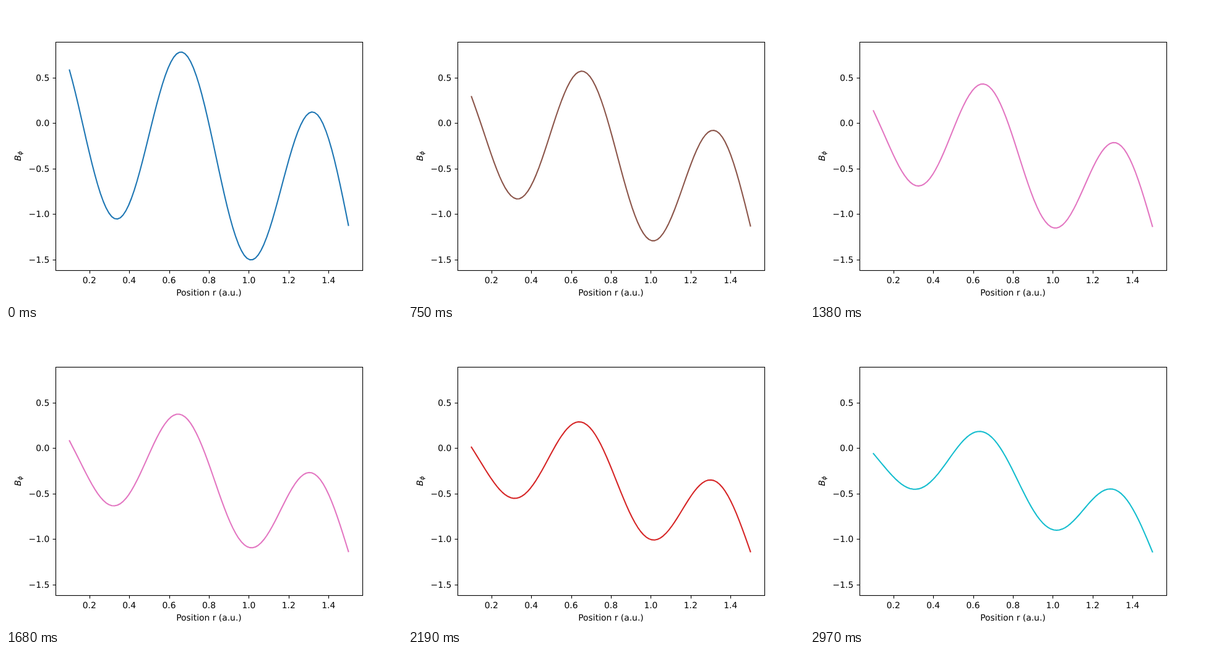
An HTML page that plays this animation: 640x480 px, repeating every 3 s.

```html
<!DOCTYPE html>
<html lang="en">
<head>
<meta charset="utf-8">
<title>Field profile over time</title>
<style>
  html, body { margin: 0; width: 100%; height: 100%; overflow: hidden; background: #fff; }
  svg { display: block; width: 640px; height: 480px; }
  text { font: 13.89px "DejaVu Sans", sans-serif; text-rendering: geometricPrecision; }
  .axis { fill: none; stroke: #000; stroke-width: 1.11; }
  #curve { fill: none; stroke-width: 2.083; stroke-linecap: square; stroke-linejoin: round; }
</style>
</head>
<body>
<svg viewBox="0 0 640 480">
  <path id="curve"/>
  <rect class="axis" x="80.5" y="58.5" width="496" height="369"/>
  <g id="ticks"></g>
  <text x="328" y="468" text-anchor="middle">Position r (a.u.)</text>
  <text transform="translate(23.6 250.5) rotate(-90)" font-style="italic" style="font-style:italic">B<tspan dy="2.2" style="font-size:9.72px">ϕ</tspan></text>
</svg>
<script>
const STEP = 30, STEPS = 100, POINTS = 100;
const R0 = 0.1, R1 = 1.5, H = (R1 - R0) / (POINTS - 1);
const COLORS = ['#1f77b4', '#ff7f0e', '#2ca02c', '#d62728', '#9467bd',
                '#8c564b', '#e377c2', '#7f7f7f', '#bcbd22', '#17becf'];

const px = r => 80 + (r - 0.03) / 1.54 * 496;
const py = b => 189.08 - b * 146.99;
const snap = v => Math.floor(v + 0.5) + 0.5;

function add(tag, attrs, label) {
  const el = document.createElementNS('http://www.w3.org/2000/svg', tag);
  for (const k in attrs) el.setAttribute(k, attrs[k]);
  if (label) el.textContent = label;
  document.getElementById('ticks').append(el);
}

for (let i = 1; i <= 7; i++) {
  const v = i * 0.2, x = px(v);
  add('path', { class: 'axis', d: `M${snap(x)} 427.5V432.4` });
  add('text', { x, y: 448, 'text-anchor': 'middle' }, v.toFixed(1));
}
for (let i = -3; i <= 1; i++) {
  const v = i * 0.5, y = py(v);
  add('path', { class: 'axis', d: `M80.5 ${snap(y)}H75.6` });
  add('text', { x: 70.3, y: y + 5.2, 'text-anchor': 'end' }, v.toFixed(1).replace('-', '−'));
}

// Cylindrical diffusion with slowly relaxing end values
const ETA = 1.0185e-4, LOSS = 2.5, SUB = 4;
const radii = Array.from({ length: POINTS }, (_, i) => R0 + i * H);
const inner = n => -0.1678 + 0.7508 * Math.exp(-0.0198 * n);
const outer = n => -1.125 - 0.021 * (1 - Math.exp(-0.018 * n));

function advance(b, n) {
  return b.map((v, i) => {
    if (i === 0) return inner(n);
    if (i === POINTS - 1) return outer(n);
    const r = radii[i], lo = b[i - 1], hi = b[i + 1];
    const rate = (hi - 2 * v + lo) / (H * H) + (hi - lo) / (2 * H * r) - v / (r * r) - LOSS * v;
    return v + ETA / SUB * rate;
  });
}

const toPath = b => 'M' + b.map((v, i) => px(radii[i]).toFixed(2) + ' ' + py(v).toFixed(2)).join('L');

const paths = [];
let field = radii.map(r => Math.cos(3 * Math.PI * r) - r * r / 2);
for (let n = 0; n < STEPS; n++) {
  paths.push(toPath(field));
  for (let s = 1; s <= SUB; s++) field = advance(field, n + s / SUB);
}

const curve = document.getElementById('curve');
let shown = -1;
function show(n) {
  if (n === shown) return;
  shown = n;
  curve.setAttribute('d', paths[n]);
  curve.setAttribute('stroke', COLORS[n % COLORS.length]);
}

const start = performance.now();
function tick() {
  const t = Math.max(0, performance.now() - start);
  show(Math.floor(t / STEP) % STEPS);
  requestAnimationFrame(tick);
}
show(0);
requestAnimationFrame(tick);
</script>
</body>
</html>
```
